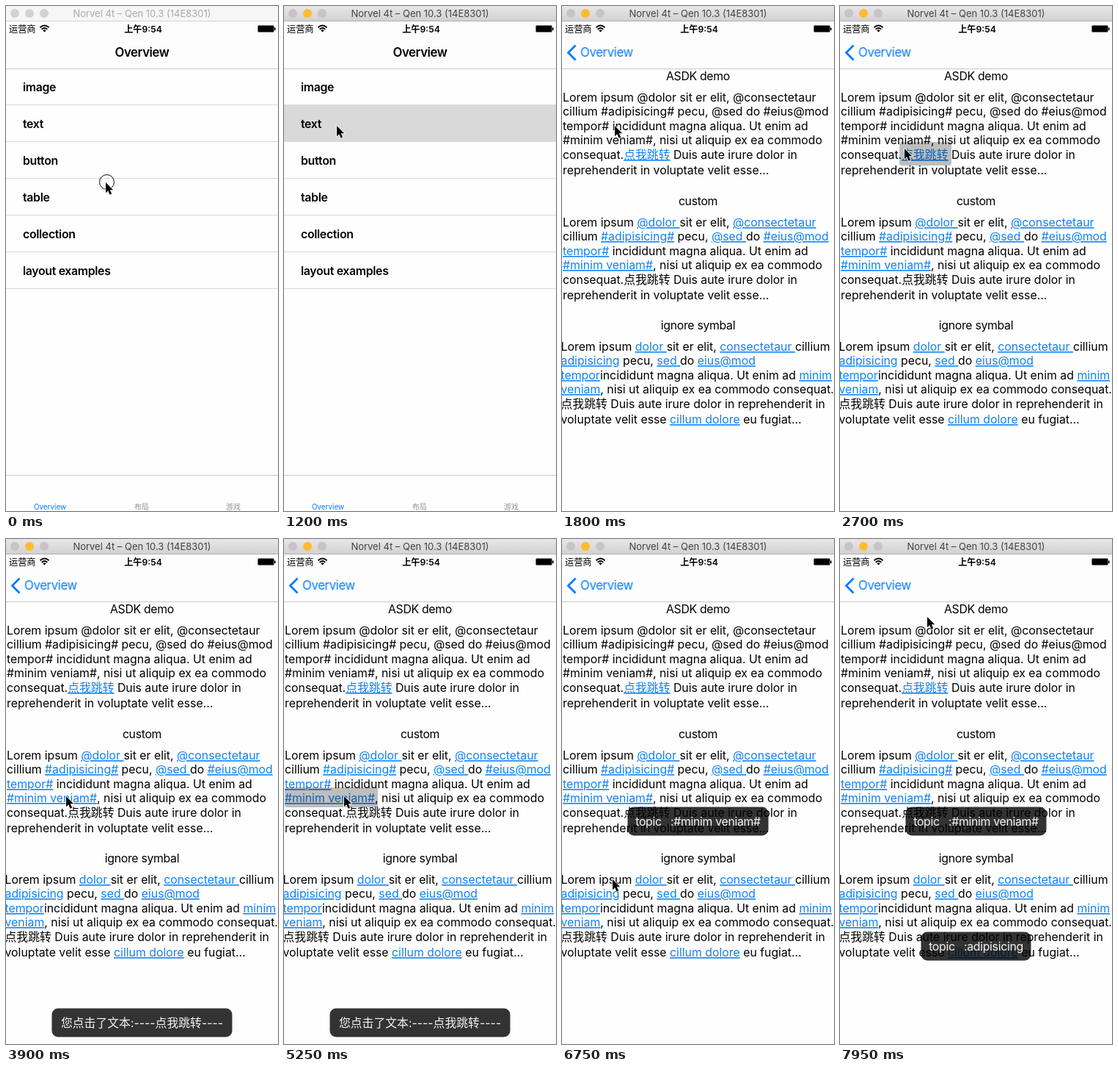
These frames come from a looping animation (371x687 px, 8000 ms). An HTML page:

```html
<!DOCTYPE html>
<html lang="zh">
<head>
<meta charset="utf-8">
<title>Text links demo</title>
<style>
html, body { margin: 0; width: 100%; height: 100%; overflow: hidden; background: #fefefe; }
svg { display: block; width: 371px; height: 687px; }
text { font: 15.83px Inter, "Noto Sans CJK SC", "Noto Sans CJK", sans-serif; fill: #000; white-space: pre; }
.label { letter-spacing: -.32px; }
.row { font-weight: 600; }
.mid { text-anchor: middle; }
.link { fill: #0f82f5; text-decoration: underline; text-decoration-thickness: 1px; text-underline-offset: 2px; text-decoration-skip-ink: none; }
.nav { font-size: 16.8px; letter-spacing: -.4px; }
.bold { font-weight: 600; }
.blue { fill: #007aff; }
.tab { font-size: 9.9px; }
.status { font-size: 12.2px; }
.win { font-size: 13px; }
.toast text { fill: #f4f4f4; }
.line { stroke: #d9d9d9; }
.edge { stroke: #c9c9c9; }
#body text { font-feature-settings: "calt" 0; }
</style>
</head>
<body>
<svg viewBox="0 0 371 687">
  <defs>
    <linearGradient id="activeBar" x2="0" y2="1">
      <stop stop-color="#e8e6e8"/><stop offset="1" stop-color="#d2d0d2"/>
    </linearGradient>
    <linearGradient id="blur">
      <stop stop-color="#f6f6f6"/><stop offset=".3" stop-color="#dedede"/>
      <stop offset=".55" stop-color="#cacaca"/><stop offset="1" stop-color="#c4c4c4"/>
    </linearGradient>
    <clipPath id="pageArea"><rect width="371" height="687"/></clipPath>
  </defs>
  <rect width="371" height="687" fill="#fefefe"/>

  <g id="overview">
    <rect id="pressed" y="135" width="371" height="49" fill="#d9d9d9"/>
    <g id="rows"></g>
    <path class="edge" d="M0 638.5H500"/>
    <text class="tab mid blue" x="60" y="684.5">Overview</text>
    <text class="tab mid" x="185" y="684.5" style="fill:#929292">布局</text>
    <text class="tab mid" x="310" y="684.5" style="fill:#929292">游戏</text>
  </g>
  <rect id="dim" y="85" width="371" height="602"/>

  <g id="page" clip-path="url(#pageArea)">
    <rect y="85" width="371" height="602" fill="#fefefe"/>
    <g id="body"></g>
    <g fill-opacity=".25">
      <rect id="press0" x="81" y="185" width="71" height="32" rx="3"/>
      <rect id="press1" x="1" y="338" width="127" height="27" rx="3"/>
      <rect id="press2" x="0" y="469" width="82" height="26" rx="3"/>
    </g>
  </g>
  <g id="toasts"></g>

  <rect y="21" width="371" height="64" fill="#fdfdfd"/>
  <rect id="navBlur" x="235" y="21" width="136" height="64" fill="url(#blur)"/>
  <path class="edge" d="M0 85.5H371"/>
  <text id="navTitle" class="nav bold mid" x="185.5" y="69">Overview</text>
  <path id="chevron" d="M18.5 53.5L8.5 63.5L18.5 73.5" fill="none" stroke="#007aff" stroke-width="2.8"/>
  <text id="back" class="nav blue" x="25" y="69">Overview</text>

  <text class="status" x="4" y="35.5">运营商</text>
  <g fill="none" stroke="#000" stroke-width="1.9">
    <path d="M46.5 29.3Q52.5 23.9 58.5 29.3M48.7 31.8Q52.5 28.4 56.3 31.8"/>
    <path d="M50.2 33.2Q52.5 31.4 54.8 33.2L52.5 35.6Z" fill="#000" stroke="none"/>
  </g>
  <text class="status bold mid" x="187" y="35.5">上午9:54</text>
  <rect x="343.5" y="26.5" width="22" height="9" rx="1.5" stroke="#777"/>
  <rect x="366" y="29.3" width="1.6" height="4" rx=".8"/>

  <g id="barIdle"></g>
  <g id="barActive"></g>

  <circle id="ring" cx="137.5" cy="239.5" r="10" fill="none" stroke="#000"/>
  <g id="cursor">
    <path d="M0 0V14.2L3.2 11.2L5.6 16.7L8.2 15.6L5.8 10.2H10.2Z" stroke="#fff" stroke-width="1.6" paint-order="stroke" stroke-linejoin="round"/>
  </g>
</svg>
<script>
const LOOP = 8000, TICK = 150;
const $ = id => document.getElementById(id);

const text = (x, y, str, cls = '') =>
  `<text class="${cls}" x="${x}" y="${y}">${str.replace(/\[(.*?)\]/g, '<tspan class="link">$1</tspan>')}</text>`;

$('rows').innerHTML = ['image', 'text', 'button', 'table', 'collection', 'layout examples']
  .map((name, i) => text(23, 115.5 + 50 * i, name, 'label row') +
    `<path class="line" d="M0 ${134.5 + 50 * i}H500"/>`).join('');

const blocks = [
  { title: 'ASDK demo', x: 1, lines: [
    'Lorem ipsum @dolor sit er elit, @consectetaur',
    'cillium #adipisicing# pecu, @sed do #eius@mod',
    'tempor# incididunt magna aliqua. Ut enim ad',
    '#minim veniam#, nisi ut aliquip ex ea commodo',
    'consequat.[点我跳转] Duis aute irure dolor in',
    'reprehenderit in voluptate velit esse…'] },
  { title: 'custom', x: 1, lines: [
    'Lorem ipsum [@dolor ]sit er elit, [@consectetaur]',
    'cillium [#adipisicing#] pecu, [@sed ]do [#eius@mod]',
    '[tempor#] incididunt magna aliqua. Ut enim ad',
    '[#minim veniam#], nisi ut aliquip ex ea commodo',
    'consequat.点我跳转 Duis aute irure dolor in',
    'reprehenderit in voluptate velit esse…'] },
  { title: 'ignore symbal', x: -1.5, lines: [
    'Lorem ipsum [dolor ]sit er elit, [consectetaur ]cillium',
    '[adipisicing] pecu, [sed ]do [eius@mod]',
    '[tempor]incididunt magna aliqua. Ut enim ad [minim]',
    '[veniam], nisi ut aliquip ex ea commodo consequat.',
    '点我跳转 Duis aute irure dolor in reprehenderit in',
    'voluptate velit esse [cillum dolore] eu fugiat…'] },
];
// The Chinese fifth line is taller, which pushes the last two lines down.
const lineOffset = i => Math.round(19.33 * i + Math.max(0, i - 3));
$('body').innerHTML = blocks.map(({ title, x, lines }, b) => {
  const y = Math.round(130 + 169.5 * b);
  return text(185.5, y - 29.5, title, 'label mid') +
    lines.map((line, i) => text(x, y + lineOffset(i), line)).join('');
}).join('');

const toast = (id, y, width, str, cls) =>
  `<g id="${id}" class="toast"><rect x="${185.5 - width / 2}" y="${y}" width="${width}" height="39" rx="8.5" fill-opacity=".8"/>` +
  text(185.5, y + 25, str, 'mid ' + cls) + '</g>';
$('toasts').innerHTML =
  toast('toast0', 638.5, 246, '您点击了文本:----点我跳转----', '') +
  toast('toast1', 364.5, 192, 'topic   :#minim veniam#', 'label') +
  toast('toast2', 534.5, 150, 'topic   :adipisicing', 'label');

const titleBar = (fill, edge, ink, dots) =>
  `<rect width="371" height="21" fill="${fill}"/><path d="M0 20.5H371" stroke="${edge}"/>` +
  dots.map((c, i) => `<circle cx="${12 + 20 * i}" cy="10" r="6" fill="${c}"/>`).join('') +
  `<text class="win mid" x="185.5" y="15" style="fill:${ink}">Norvel 4t – Qen 10.3 (14E8301)</text>`;
$('barIdle').innerHTML = titleBar('#f6f6f6', '#d4d4d4', '#aaa', ['#d2d2d2', '#d2d2d2', '#d2d2d2']);
$('barActive').innerHTML = titleBar('url(#activeBar)', '#b2b0b2', '#444', ['#c6c4c6', '#fdbc2e', '#c6c4c6']);

// Key points are [time in ms, value]; the way between them is cut into ticks.
function play(id, prop, points) {
  const keys = points.filter(([time]) => time < LOOP);
  if (keys[0][0] > 0) keys.unshift([0, keys[0][1]]);
  keys.push([LOOP, keys.at(-1)[1]]);
  const frames = keys.map(([time, value], i) => {
    const next = keys[i + 1]?.[0] ?? LOOP;
    const ticks = Math.max(1, Math.round((next - time) / TICK));
    return { offset: time / LOOP, [prop]: value, easing: `steps(${ticks}, end)` };
  });
  $(id).animate(frames, { duration: LOOP, iterations: Infinity });
}
const fade = (id, ...points) => play(id, 'opacity', points);
const move = (id, ...points) =>
  play(id, 'transform', points.map(([time, x, y = 0]) => [time, `translate(${x}px, ${y}px)`]));
const swap = (id, time, before, after) => fade(id, [time - TICK, before], [time, after]);
const flash = (id, from, to) => fade(id, [from - TICK, 0], [from, 1], [to - TICK, 1], [to, 0]);

// Push transition: u is progress, k the eased share of the way still to go.
const PUSH_START = 1200, PUSH_TICKS = 4;
const pushed = (animate, id, rule) =>
  animate(id, ...Array.from({ length: PUSH_TICKS + 1 }, (_, i) => {
    const u = i / PUSH_TICKS;
    return [PUSH_START + i * TICK, rule(u, (1 - u) ** 3.4)];
  }));
pushed(move, 'page', (u, k) => 371 * k);
pushed(move, 'overview', (u, k) => -111 * (1 - k));
pushed(move, 'navTitle', (u, k) => -124.5 * (1 - k));
pushed(move, 'back', (u, k) => 124.5 * k);
pushed(fade, 'dim', (u, k) => .1 * (1 - k));
pushed(fade, 'navTitle', u => (1 - u) ** 3.5);
pushed(fade, 'back', u => u * u);
pushed(fade, 'chevron', u => u * u);
pushed(fade, 'navBlur', u => Math.sin(Math.PI * u));

swap('barIdle', PUSH_START, 1, 0);
swap('barActive', PUSH_START, 0, 1);
flash('pressed', PUSH_START, PUSH_START + 2 * TICK);

// Each tap flashes its link and brings up a toast for about three seconds.
[2700, 5250, 7050].forEach((tap, i) => {
  flash('press' + i, tap, tap + 300);
  fade('toast' + i, [tap, 0], [tap + 300, 1], [tap + 3150, 1], [tap + 3600, 0]);
});

swap('ring', TICK, 1, 0);
move('cursor',
  [0, 136, 240], [450, 75, 184], [600, 100, 174], [750, 100, 174],
  [900, 72, 163], [1800, 72, 163], [2100, 121, 205],
  [2400, 88, 194], [3000, 88, 194], [3600, 100, 350],
  [3900, 82, 350], [6150, 82, 350], [6600, 49, 440],
  [6750, 69, 463], [7350, 69, 463], [7950, 119, 106]);
</script>
</body>
</html>
```
